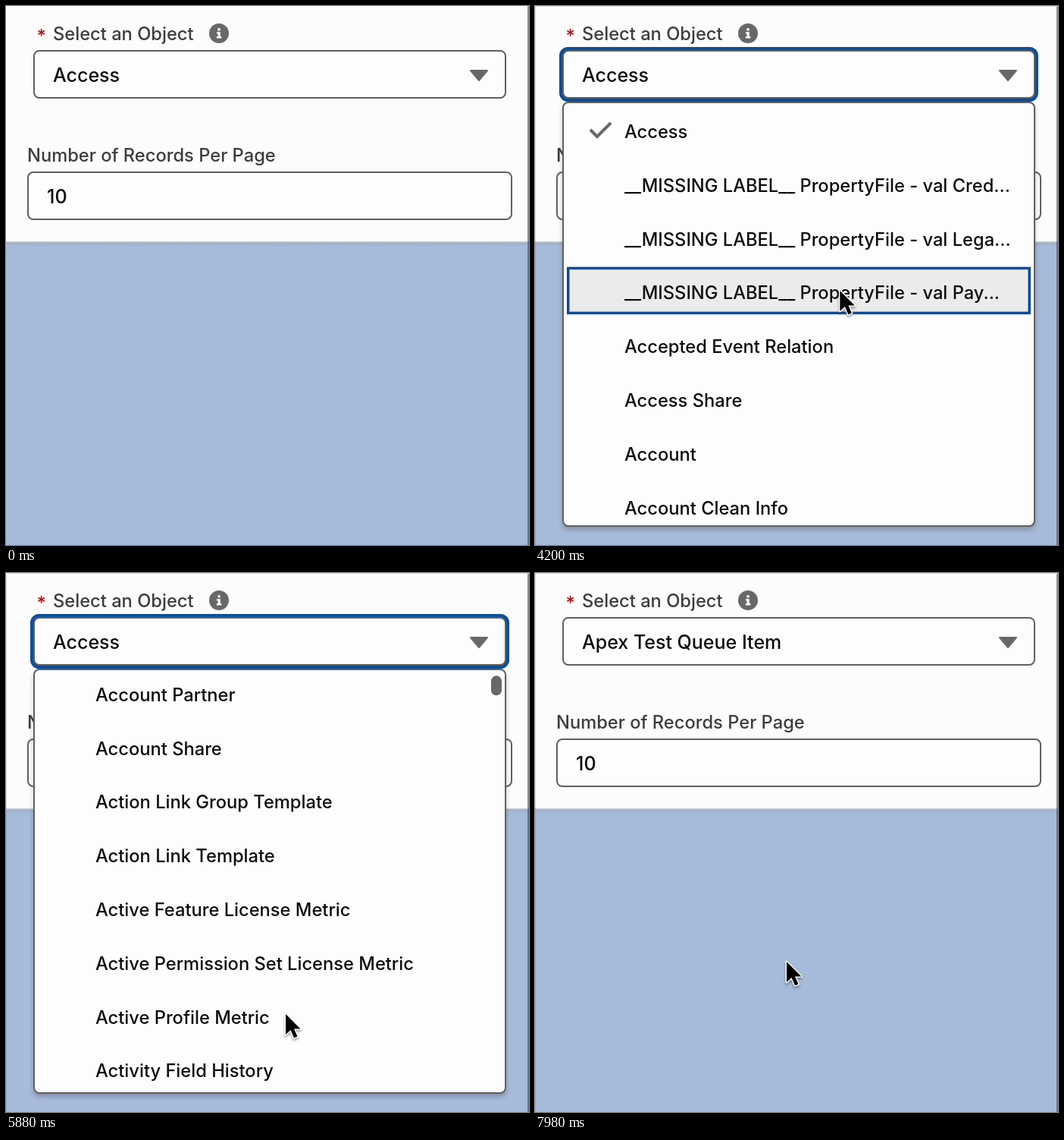
Animation of 690x710 px, one loop 8000 ms. Source, as an HTML page:

```html
<!DOCTYPE html>
<html lang="en">
<head>
<meta charset="utf-8">
<title>Object picker</title>
<style>
  html, body { margin: 0; width: 100%; height: 100%; overflow: hidden; background: #a6bbda; }
  svg { display: block; width: 690px; height: 710px; }
  text { font: 450 23.7px Inter, "Open Sans", sans-serif; fill: #0c0c0c; white-space: pre; }
  .label { fill: #3c3c3c; }
  .value { font-size: 25px; }
  .box { fill: #fdfdfd; stroke: #606060; stroke-width: 2; }
  .mark { fill: #686868; }
  #menu .box { filter: drop-shadow(0 4px 3px #00000038); }
  #cursor { filter: drop-shadow(0 2px 1.5px #00000060); }
</style>
</head>
<body>
<svg viewBox="0 0 690 710">
  <defs>
    <linearGradient id="edge" x2="0" y2="1">
      <stop offset="0" stop-color="#d2d5da"/>
      <stop offset=".35" stop-color="#9fb0c9"/>
      <stop offset="1" stop-color="#a6bbda"/>
    </linearGradient>
    <clipPath id="menuClip"><rect x="38" y="128" width="620" height="556" rx="6"/></clipPath>
  </defs>

  <rect width="690" height="710" fill="#a6bbda"/>
  <rect width="690" height="310" fill="#fcfcfc"/>
  <rect y="310" width="690" height="7" fill="url(#edge)"/>
  <rect x="688" width="2" height="310" fill="#8a8a8a"/>
  <rect x="688" y="310" width="2" height="400" fill="#637188"/>
  <g id="frameEdge">
    <rect width="690" height="1" fill="#dcdcdc"/>
    <rect width="1" height="310" fill="#dcdcdc"/>
    <rect y="310" width="1" height="400" fill="#94a8c6"/>
  </g>

  <text x="40.5" y="48" style="fill:#b01010;font-weight:500">*</text>
  <text class="label" x="62" y="45">Select an Object</text>
  <circle class="mark" cx="281" cy="36" r="13"/>
  <path d="M279.3 29.2h3.4v3.2h-3.4zM278 34.2h4.8v6h1.6v2.2h-6.6v-2.2h1.8v-3.8h-1.6z" fill="#fcfcfc"/>

  <text class="label" x="28" y="205">Number of Records Per Page</text>
  <rect class="box" x="29" y="219" width="638" height="62" rx="7"/>
  <text class="value" x="54" y="260">10</text>

  <rect id="ring" x="34.5" y="56.5" width="627" height="67" rx="9" fill="none" stroke="#0b4f9c" stroke-width="5"/>
  <rect class="box" x="37" y="59" width="622" height="62" rx="7"/>
  <text class="value" id="value" x="62" y="100"></text>
  <path class="mark" d="M613 85h22l-11 13z" stroke="#686868" stroke-width="2" stroke-linejoin="round"/>

  <g id="menu">
    <rect class="box" x="37" y="127" width="622" height="558" rx="7"/>
    <g clip-path="url(#menuClip)">
      <g id="list">
        <rect id="hover" x="43.75" width="608.5" height="59" fill="#ebebeb" stroke="#0b4a9a" stroke-width="3.5"/>
        <path d="M73 163l9 9 18-18" fill="none" stroke="#686868" stroke-width="4"/>
      </g>
    </g>
    <rect class="mark" id="thumb" x="640" width="14" height="26" rx="7"/>
  </g>

  <path id="cursor" d="M0 1V28L6.5 22L11 32.5L15.5 30.5L11 20.5H19.5Z"
        stroke="#fff" stroke-width="3" paint-order="stroke" stroke-linejoin="round"/>
</svg>
<script>
const LOOP = 8000, ROW = 70.8, BASELINE = 174;
const OPEN = 3500, CLOSE = 7600;

const items = `Access
__MISSING LABEL__ PropertyFile - val Cred...
__MISSING LABEL__ PropertyFile - val Lega...
__MISSING LABEL__ PropertyFile - val Pay...
Accepted Event Relation
Access Share
Account
Account Clean Info
Account Contact Role
Account Feed
Account History
Account Partner
Account Share
Action Link Group Template
Action Link Template
Active Feature License Metric
Active Permission Set License Metric
Active Profile Metric
Activity Field History
Activity History
Activity Metric
Activity Metric Rollup
Additional Directory Number
Address
AI Application
AI Application Config
AI Insight Action
AI Insight Feedback
AI Insight Reason
AI Insight Value
AI Metric
AI Record Insight
Alternative Payment Method
Alternative Payment Method History
Alternative Payment Method Share
Analytics Asset
Analytics Sample
Announcement
Apex Class
Apex Debug Log
Apex Email Notification
Apex Job
Apex Page Info
Apex Test Queue Item
Apex Test Result
Apex Test Result Limit
Apex Test Run Result`.split("\n");

// Rows of time, then one or more values
const cursorPath = [
  [20, 694, 285], [420, 570, 120], [820, 481, -8], [1560, 434, 128], [1680, 434, 128],
  [1820, 434, 122], [2360, 434, 122], [2800, 452, 106], [3200, 443, 94], [3600, 443, 94],
  [4300, 400, 390], [4850, 369, 580], [6300, 369, 580], [6440, 361, 561], [6560, 361, 561],
  [7300, 332, 511], [8000, 332, 511]
];
// Two flicks with a short rest between them
const scrollPath = [
  [5100, 0], [5450, 350], [5820, 784], [5910, 784], [6100, 1700], [6250, 2400], [6420, 2709]
];
const thumbFade = [[5100, 0], [5180, 1], [6900, 1], [7150, 0]];

const byId = id => document.getElementById(id);
const [frameEdge, ring, value, menu, list, hover, thumb, cursor] =
  ["frameEdge", "ring", "value", "menu", "list", "hover", "thumb", "cursor"].map(byId);
const linear = k => k;
const smooth = k => k * k * (3 - 2 * k);
const show = (el, on) => el.setAttribute("visibility", on ? "visible" : "hidden");

function sample(path, t, ease = linear) {
  const next = path.findIndex(row => row[0] > t);
  if (next < 0) return path.at(-1).slice(1);
  if (next === 0) return path[0].slice(1);
  const a = path[next - 1], b = path[next];
  const k = ease((t - a[0]) / (b[0] - a[0]));
  return a.slice(1).map((v, i) => v + (b[i + 1] - v) * k);
}

items.forEach((name, i) => {
  const row = document.createElementNS("http://www.w3.org/2000/svg", "text");
  row.setAttribute("x", 118);
  row.setAttribute("y", BASELINE + i * ROW);
  row.textContent = name;
  list.append(row);
});

function draw(t) {
  const [x, y] = sample(cursorPath, t, smooth);
  const [scroll] = sample(scrollPath, t);
  const open = t >= OPEN && t < CLOSE;
  const scrolling = t > 5100 && t < 6420;
  const row = Math.max(0, Math.floor((y + scroll - 130) / ROW));

  show(frameEdge, t >= OPEN);
  show(ring, open);
  show(menu, open);
  show(hover, open && !scrolling);
  show(cursor, t >= 20);
  value.textContent = t < CLOSE ? "Access" : "Apex Test Queue Item";
  list.setAttribute("transform", `translate(0 ${-scroll})`);
  hover.setAttribute("y", BASELINE - 41 + row * ROW);
  thumb.setAttribute("y", 130 + scroll / 147);
  thumb.setAttribute("opacity", sample(thumbFade, t)[0]);
  cursor.setAttribute("transform", `translate(${x} ${y})`);
}

const start = performance.now();
function tick() {
  draw((performance.now() - start) % LOOP);
  requestAnimationFrame(tick);
}
tick();
</script>
</body>
</html>
```
